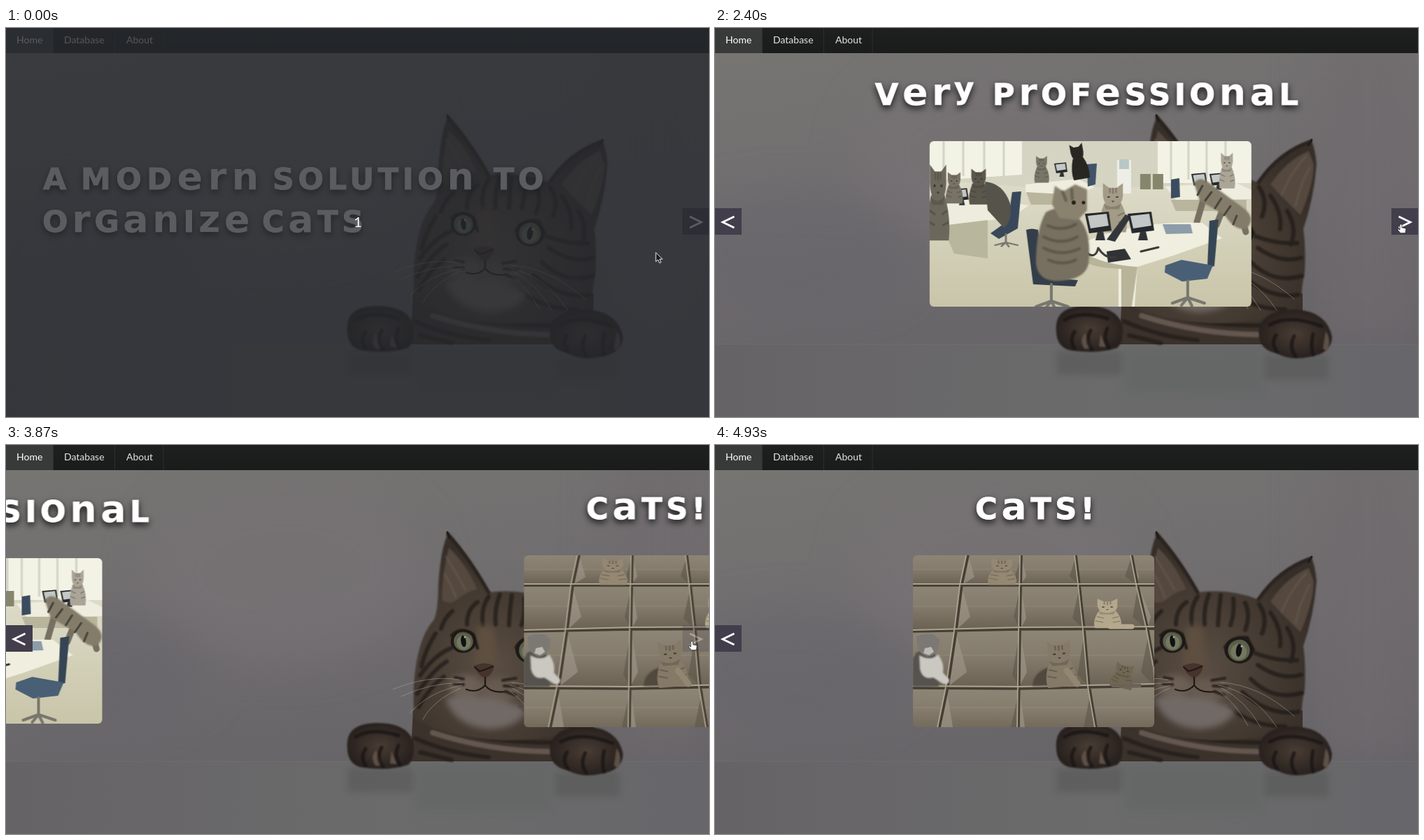
These frames come from a looping animation (1005x557 px, 5860 ms). An HTML page without scripts:

```html
<!DOCTYPE html>
<html lang="en">
<head>
<meta charset="utf-8">
<title>Organize cats</title>
<style>
html, body { margin: 0; width: 100%; height: 100%; overflow: hidden; background: #6f6c6e; }
svg { display: block; width: 100%; height: 100%; }

.nav { font: 14px Lato, sans-serif; fill: #e4e4e4; }
.title { font: bold 43px "DejaVu Sans", sans-serif; letter-spacing: 5.6px; fill: #fff; stroke: #fff; filter: drop-shadow(0 4px 5px rgba(0,0,0,.8)); }
.title .l { font-size: 54px; stroke: none; }
.line { fill: none; stroke-linecap: round; stroke-linejoin: round; }
.soft { filter: blur(5px); }
.fuzz { filter: blur(1.2px); }

.track, .prev, .next, .arrow, .hand, .veil { animation: 5860ms infinite; }
.track { animation-name: slide; animation-timing-function: ease; }
.prev { animation-name: show; animation-timing-function: linear; }
.next { animation-name: hide; animation-timing-function: linear; }
.arrow { animation-name: point; animation-timing-function: step-end; }
.hand { animation-name: press; animation-timing-function: step-end; }
.veil { animation-name: lift; animation-timing-function: step-end; }

@keyframes slide {
  0%, 35.273% { transform: translateX(0); }
  43.976%, 63.089% { transform: translateX(-1005px); }
  72.474%, 100% { transform: translateX(-2010px); }
}
@keyframes show { 0%, 35.2% { opacity: 0; } 35.32% { opacity: .1; } 39.2%, 100% { opacity: 1; } }
@keyframes hide { 0%, 63.09% { opacity: 1; } 67%, 100% { opacity: 0; } }
@keyframes point {
  0% { transform: translate(929px,321px); opacity: 1; }
  11.945% { transform: translate(938px,315px); }
  13.652% { transform: translate(947px,305px); }
  15.358% { transform: translate(954px,296px); }
  18.771% { transform: translate(960px,292px); }
  20.478% { transform: translate(966px,288px); opacity: 1; }
  22.184% { transform: translate(966px,288px); opacity: 0; }
  81.911% { transform: translate(962px,222px); opacity: 1; }
  82.935% { transform: translate(934px,146px); opacity: 1; }
  84.13%, 100% { transform: translate(934px,146px); opacity: 0; }
}
@keyframes press { 0% { opacity: 0; } 22.184% { opacity: 1; } 81.911%, 100% { opacity: 0; } }
@keyframes lift { 0% { opacity: 1; } .512%, 100% { opacity: 0; } }
</style>
</head>
<body>
<svg viewBox="0 0 1005 557" preserveAspectRatio="none">
<defs>
  <linearGradient id="wall" x2=".25" y2="1">
    <stop stop-color="#777672"/><stop offset=".45" stop-color="#716e70"/><stop offset="1" stop-color="#656267"/>
  </linearGradient>
  <linearGradient id="table">
    <stop stop-color="#666367"/><stop offset=".55" stop-color="#6b6b6b"/><stop offset="1" stop-color="#67666a"/>
  </linearGradient>
  <linearGradient id="bar" x2="0" y2="1"><stop stop-color="#1d201f"/><stop offset="1" stop-color="#191c1b"/></linearGradient>
  <radialGradient id="fur" cx=".4" cy=".65" r=".62">
    <stop stop-color="#5b4f44"/><stop offset=".5" stop-color="#473d34"/><stop offset="1" stop-color="#362e28"/>
  </radialGradient>
  <radialGradient id="paw"><stop stop-color="#493d34"/><stop offset="1" stop-color="#28211e"/></radialGradient>
  <linearGradient id="floor" x2="0" y2="1"><stop stop-color="#e4e3d3"/><stop offset="1" stop-color="#c9c5a9"/></linearGradient>
  <linearGradient id="card" x2="0" y2="1"><stop stop-color="#8d8575"/><stop offset=".45" stop-color="#857c6d"/><stop offset="1" stop-color="#6a6153"/></linearGradient>
  <clipPath id="wide"><rect width="460" height="237" rx="6"/></clipPath>
  <clipPath id="tall"><rect width="345" height="246" rx="6"/></clipPath>

  <g id="kit">
    <path d="M-11 8Q-20 30-16 46H17Q21 26 10 7z" fill="currentColor"/>
    <path d="M-13-3L-13-18-5-12H5L13-18 13-2Q12 12 0 13-12 12-13-3z" fill="currentColor"/>
    <path class="line" d="M-4-11v5M0-11v6M4-11v5M-13 21l8 3M-15 30l9 3M14 21l-7 3M16 31l-8 2" stroke="#2b261f" stroke-opacity=".3" stroke-width="2"/>
    <path d="M-7-1h3v2h-3zM4-1h3v2H4zM-2 5h4l-2 2z" fill="#2b261f" opacity=".8"/>
    <path d="M-12 9Q0 17 11 8L8 16H-9z" fill="#2b261f" opacity=".22"/>
  </g>
  <g id="eye">
    <ellipse rx="20" ry="18" fill="#1e1a17"/><circle r="15" fill="#5c604b"/><circle cy="2" r="11" fill="#737860"/>
    <ellipse rx="4" ry="9" fill="#111"/><circle cx="3" cy="-6" r="1.500" fill="#a9aba0"/>
  </g>
  <g id="screen">
    <path d="M0 0L34-3 38 24 6 28z" fill="#26282b"/><path d="M4 3L31 0 34 17 8 21z" fill="#c3c7c6"/>
    <path d="M18 26l8-1 3 13H15z" fill="#303236"/>
  </g>
  <g id="seat">
    <path class="line" d="M0 0v24M0 24l-22 8M0 24l24 8M0 24l6 12M0 24l-9 11" stroke="#77776d" stroke-width="4"/>
  </g>
  <g id="button">
    <path d="M0 0h38v38H0z" fill="#423e4c"/>
    <path d="M10.500 12L27 20 10.500 28" fill="none" stroke="#fff" stroke-width="2.800"/>
  </g>
</defs>

<rect width="1005" height="557" fill="url(#wall)"/>
<g style="filter:blur(30px)">
  <ellipse cx="110" cy="320" rx="180" ry="85" fill="#67656a" opacity=".5"/>
  <ellipse cx="400" cy="180" rx="200" ry="130" fill="#777375" opacity=".7"/>
  <path d="M860 0h145v453H860z" fill="#706c6e" opacity=".7"/>
</g>
<path d="M0 453H1005V557H0z" fill="url(#table)"/>
<path d="M0 453H1005" stroke="#777477" stroke-opacity=".6"/>
<g class="soft">
  <path d="M488 462h94v35h-94zM785 468h92v35h-92z" fill="#595a59" opacity=".7"/>
  <path d="M585 458h195v65H585z" fill="#656766" opacity=".8"/>
</g>

<g class="cat">
  <path d="M582 380H840V420L795 453H578z" fill="#3b322b"/>
  <path class="line fuzz" d="M610 412Q690 438 776 439" stroke="#645750" stroke-width="8"/>
  <path class="line fuzz" d="M585 420q50 22 105 27M592 440l45 11M660 414q50 12 120 12M740 404q40 10 75 3" stroke="#231d1a" stroke-width="6" opacity=".8"/>
  <path class="fuzz" fill="url(#fur)" d="M632 127Q622 145 618 200 618 235 612 250 594 270 587 310 580 350 584 392 630 420 710 423 800 422 839 400 837 375 843 350 845 315 841 288 856 245 860 195 858 172 852 160 805 178 776 221 735 205 690 211 668 165 632 127z"/>
  <g class="fuzz">
    <path d="M633 147Q624 180 623 222 637 232 652 216 665 208 674 207 658 170 633 147zM849 176Q817 189 794 224 812 244 837 268 856 225 856 195z" fill="#54483f"/>
    <path class="line" d="M629 160q16 25 28 47M627 185q10 15 16 33M845 184q-20 20-35 55M850 200q-14 25-20 55" stroke="#6d5f56" stroke-width="3" opacity=".5"/>
    <path class="line" d="M632 128Q661 161 690 211M851 163Q806 178 777 221" stroke="#2a231f" stroke-width="5"/>
  </g>
  <path class="line" d="M634 133l-3-8M848 168l5-8" stroke="#211c19" stroke-width="3"/>

  <g class="line fuzz" stroke="#1f1a17" stroke-width="6" opacity=".72">
    <path d="M690 217q-12 17-8 42M706 214q-8 20-6 43M723 215q-3 22-4 43M741 220q2 20-4 38M758 226q8 18 0 39M674 225q-15 10-15 32M778 228q13 20 4 42"/>
    <path d="M638 238q-12 10-16 25M614 270q-14 22-20 47M794 240q17 24 14 48M818 262q15 25 5 48"/>
    <path d="M636 291q-23 9-44 39M630 310q-21 13-42 46M626 332q-19 13-36 43M772 298q32 12 60 10M776 315q34 23 62 14M766 335q32 32 73 20M754 354q39 35 80 28M735 376q34 27 80 27"/>
  </g>
  <path class="soft" d="M674 262Q682 252 698 264L702 315H669z" fill="#5e4f40"/>
  <g class="soft">
    <ellipse cx="657" cy="345" rx="24" ry="16" fill="#6d6056"/>
    <ellipse cx="706" cy="350" rx="28" ry="17" fill="#675a50"/>
    <path d="M628 362Q680 350 745 378 735 405 690 407 640 402 628 362z" fill="#716965"/>
  </g>
  <use href="#eye" transform="translate(654 281) rotate(-8) scale(.92)"/>
  <use href="#eye" transform="translate(749 294) rotate(8) scale(1.04)"/>
  <path class="line fuzz" d="M637 273q12-14 31-2l6 20M729 290q10-17 32-14l9 18" stroke="#1d1815" stroke-width="4"/>
  <path d="M669 316q15-7 29 0-2 13-13 18-12-5-16-18z" fill="#46332c"/>
  <path class="line" d="M670 318l7 6 7-2 12-5M685 333v11M658 350q16 6 27-6 8 12 30 9" stroke="#201815" stroke-width="2.200"/>
  <path class="line fuzz" d="M642 333l12 2M640 342l14 1M710 337l19-3M712 345l20 1M714 353l14 5" stroke="#2b231f" stroke-width="4"/>
  <g class="line" stroke="#b1a79f" stroke-opacity=".5">
    <path d="M652 340q-48 1-87 20M652 344q-47 9-75 40M650 348q-40 18-54 45M648 336q-45-7-95 14"/>
    <path d="M720 344q50 10 83 60M724 348q35 18 56 56M723 340q54 3 105 48M720 352q25 18 42 50"/>
  </g>
  <g class="fuzz">
    <path d="M488 424Q491 399 528 398 571 397 582 423 585 450 575 458 547 467 511 462 485 459 488 424z" fill="url(#paw)"/>
    <path d="M778 429Q786 403 830 403 875 406 882 442 882 466 850 471 824 477 803 466 774 460 778 429z" fill="url(#paw)"/>
    <path d="M529 437q-9 10-1 22 9 2 9-5zM551 438l-2 18 10 1zM873 434q9 13 2 29l-6-4z" fill="#5f5046"/>
    <path class="line" d="M500 418q22-14 61-2M514 435q-8 12 0 24M537 433q-8 15 2 27M561 430q-7 15 2 28M793 425q28-16 74 2M802 440q-8 12 2 24M828 441q-8 16 2 29M855 438q-4 17 0 30" stroke="#191514" stroke-width="5" opacity=".8"/>
  </g>
</g>

<g class="track">
  <g class="title">
    <text y="231"><tspan x="53">A</tspan> <tspan x="107" letter-spacing="7.5">MOD</tspan><tspan class="l" letter-spacing="7.5">ern</tspan> <tspan x="381">SOLUTIO</tspan><tspan class="l">n</tspan> <tspan x="697">TO</tspan></text>
    <text y="292"><tspan x="52">O</tspan><tspan class="l">r</tspan>G<tspan class="l">an</tspan>I<tspan class="l">ze</tspan> <tspan x="366">C</tspan><tspan class="l">a</tspan>TS</text>
  </g>

  <g transform="translate(1005)">
    <text class="title" y="110"><tspan x="147">V</tspan><tspan class="l">er</tspan><tspan dy="-9">y</tspan> <tspan x="315" dy="9">P</tspan><tspan class="l">r</tspan>OF<tspan class="l">e</tspan>SSIO<tspan class="l">na</tspan>L</text>
    <g transform="translate(225 162)" clip-path="url(#wide)">
      <path d="M0 0h460v237H0z" fill="url(#floor)"/>
      <path d="M0 0h460v48L325 66H140L0 55z" fill="#d5d4c3"/>
      <path d="M0 0h132v48L0 57zM326 0h134v60H326z" fill="#f2f2e5"/>
      <path d="M20 0v50M48 0v50M78 0v50M106 0v50M345 0v55M370 0v55M396 0v55M423 0v55" stroke="#d4d4c4" stroke-width="3"/>
      <path d="M268 27h20v48h-20z" fill="#eeeee7"/><path d="M271 26h14v14h-14z" fill="#b9c7c5"/>
      <path d="M301 47h15v22h-15zM319 47h15v22h-15z" fill="#85866b"/>
      <path d="M137 62l75-8 24 12-28 12-71-4zM337 65l100-6 23 11v13l-108 1z" fill="#eeedde"/>
      <path d="M138 73l70 4v14h-63zM345 84h108v16H352z" fill="#b9b59d"/>
      <use href="#screen" transform="translate(178 32) scale(.5)"/>
      <use href="#screen" transform="translate(374 47) scale(.6)"/>
      <use href="#screen" transform="translate(400 47) scale(.6)"/>
      <use href="#kit" transform="translate(160 32) scale(.6)" color="#777567"/>
      <path d="M225 33l14-1-2 30-11 3z" fill="#405369"/>
      <use href="#kit" transform="translate(211 18) rotate(-10) scale(.7 .8)" color="#292722"/>
      <use href="#kit" transform="translate(425 31) scale(.65 .8)" color="#aaa596"/>
      <path d="M345 55l12-2 1 27-13 2z" fill="#3c4c60"/>

      <path d="M0 93L70 80 142 92 116 110 18 121z" fill="#edecdd"/>
      <path d="M18 121l65-8v55l-48-7z" fill="#b9b69e"/>
      <use href="#screen" transform="translate(33 69) scale(.6)"/>
      <use href="#kit" transform="translate(12 64) scale(.9 1.700)" color="#6c675b"/>
      <use href="#kit" transform="translate(35 57) scale(.7)" color="#787365"/>
      <path d="M118 73l13-1-5 53-27 15-12-8 25-18z" fill="#39475a"/>
      <use href="#seat" transform="translate(109 133) scale(.7 .5)"/>
      <use href="#kit" transform="translate(70 54) scale(.8)" color="#5c574d"/>
      <path d="M79 58q26 2 36 31 4 26-9 35L83 99z" fill="#55534a"/>

      <path class="line" d="M388 65q20 27 57 47M393 78l-11 38M420 95l-10 25M445 105l7 25" stroke="#777061" stroke-width="9"/>
      <path class="fuzz" d="M378 60q8-11 22 0l49 36q18 14 5 28-16 7-32-18l-36-21z" fill="#837c6a"/>
      <path class="line" d="M390 64l-7 13M403 73l-9 12M417 82l-9 14M430 93l-9 13M439 107l-5 12" stroke="#49443a" stroke-width="3"/>

      <path d="M216 147Q290 113 390 117L418 139 348 164 297 180 293 237H270V181Q240 179 216 166z" fill="#efeedf"/>
      <path d="M216 157q30 20 81 23l-8 57h-15v-54q-48-2-58-15z" fill="#b7b499"/>
      <path d="M333 119h40l3 13-38 1z" fill="#8d9ca9"/>
      <use href="#kit" transform="translate(262 80) scale(1.100)" color="#a39b86"/>
      <use href="#screen" transform="translate(222 104)"/>
      <path d="M280 105l8 3-23 36-12-3z" fill="#33363a"/>
      <use href="#screen" transform="translate(283 104)"/>
      <path d="M253 158l26-4 9 15-33 5z" fill="#303235"/>
      <path class="line" d="M222 158q15 13 19-5 10 16 25 13M302 158l25-6" stroke="#3a3b37" stroke-width="3"/>

      <path d="M138 127q8-3 17 0l11 68 46 4-4 9-60-3z" fill="#343e4a"/>
      <use href="#seat" transform="translate(174 205)"/>
      <g class="fuzz">
        <path d="M166 102q20-12 43 4 24 21 18 70-5 22-41 24-31 2-34-25 0-48 14-73z" fill="#777060"/>
        <path d="M179 64l12 8 17-10 17 7 0 30-13 14-27-3-10-20z" fill="#8a826f"/>
        <path class="line" d="M169 121q20 9 40-2M163 137q25 13 48 0M163 153q25 13 51 1M170 170q20 9 39 0M190 72l5 13M203 69l1 14" stroke="#4b463b" stroke-width="4" opacity=".6"/>
      </g>
      <circle cx="206" cy="88" r="3" fill="#28251f"/><circle cx="220" cy="88" r="2.500" fill="#28251f"/>
      <path d="M400 114l13-2-6 67-10 2z" fill="#354554"/>
      <path d="M337 178l23-8 45 8-8 19-36 4-25-13z" fill="#495f75"/>
      <use href="#seat" transform="translate(369 200)"/>
    </g>
  </g>

  <g transform="translate(2010)">
    <text class="title" y="106" letter-spacing="5"><tspan x="372">C</tspan><tspan class="l">a</tspan>TS!</text>
    <g transform="translate(283 158)" clip-path="url(#tall)">
      <g fill="url(#card)">
        <path d="M0 0h345v42H0z"/><path d="M0 42h345v65H0z"/><path d="M0 107h345v82H0z"/><path d="M0 189h345v70H0z"/>
      </g>
      <path d="M0 20h345M0 73h345M0 143h345M0 218h345" stroke="#9a9181" stroke-opacity=".6"/>
      <g fill="#a0978a" opacity=".65">
        <path d="M79 0l9 31-18 11zM155 0l7 30-8 12zM313 0l10 30-3 12z"/>
        <path d="M69 42l13 46-20 19zM154 42l8 48-9 17zM322 42l18 46-5 19z"/>
        <path d="M61 107l16 60-27 21zM153 107l10 60-11 21zM338 107l12 60-5 21z"/>
        <path d="M48 191l9 55H38zM152 191l8 55h-9z"/>
      </g>
      <g fill="#5d564a" opacity=".6">
        <path d="M155 0l-9 30 8 12zM233 0l-9 30 13 12zM313 0l-10 30 17 12z"/>
        <path d="M154 42l-10 46 9 19zM239 42l-11 48 17 17zM322 42l-8 46 21 19z"/>
        <path d="M153 107l-11 64 10 17zM246 107l-11 64 17 17zM338 107l-12 60 19 21z"/>
        <path d="M152 191l-12 55h11zM255 191l-11 55h18z"/>
      </g>
      <g class="line">
        <path d="M0 43h345M0 109l153-3 192-1M0 190l152 1 193-4M79 0l-9 42-8 65-12 81-12 58M155 0l-2 107-2 139M233 0l5 42 7 65 7 81 10 58M313 0l8 42 15 65 9 50" stroke="#453e34" stroke-width="3.500"/>
        <path d="M0 41h345M0 107l153-4 192-1M0 187l152 1 193-4M76 0l-9 42-8 65-12 81-12 58M153 0l-2 107-2 139M231 0l5 42 7 65 7 81 10 58M311 0l8 42 15 65 9 50" stroke="#aca28f" stroke-width="1.800"/>
      </g>
      <use href="#kit" transform="translate(127 15) scale(1.150 .6)" color="#958873"/>
      <use href="#kit" transform="translate(278 74) scale(1.100 .66)" color="#b3a88c"/>
      <path class="line" d="M282 102h31" stroke="#b5aa8e" stroke-width="7"/>
      <g class="fuzz">
        <path d="M4 140q15-9 28 2l5 46H0v-40z" fill="#56524e"/>
        <path d="M9 143q16 9 27-1 9 12 7 26l9 10q0 8-9 6l-14-9q-15 4-19-12z" fill="#cbc8c2"/>
      </g>
      <path d="M6 128l-1-12 10-3h14l9 7-2 15q-6 10-16 10-12-4-14-17z" fill="#7c7974"/>
      <path d="M17 133l9-2 4 7-7 5-8-3z" fill="#bdbab4"/>
      <path class="fuzz" d="M171 187q1-20 24-27l12 26z" fill="#51493d"/>
      <use href="#kit" transform="translate(209 141) rotate(-5) scale(1.250 1.030)" color="#857a68"/>
      <path class="line" d="M220 165l15 19" stroke="#91866f" stroke-width="9"/>
      <use href="#kit" transform="translate(302 165) rotate(14) scale(.95 .55)" color="#716654"/>
      <path d="M284 184h42v5h-42z" fill="#6b6356"/>
    </g>
  </g>
</g>

<g class="nav">
  <path d="M0 0h1005v36H0z" fill="url(#bar)"/>
  <path d="M0 0h67v36H0z" fill="#383a3a"/>
  <path d="M67.500 0v36M155.500 0v36M225 0v36" stroke="#2c2f2e"/>
  <text x="15" y="22" fill="#fff">Home</text>
  <text x="83" y="22">Database</text>
  <text x="172" y="22">About</text>
</g>

<g class="prev"><use href="#button" transform="translate(38 258) scale(-1 1)"/></g>
<g class="next"><use href="#button" transform="translate(967 258)"/></g>

<g class="veil">
  <path d="M0 0h1005v557H0z" fill="#272a2e" fill-opacity=".76"/>
  <text x="503" y="285" text-anchor="middle" fill="#fff" style="font:20px Lato,sans-serif">1</text>
</g>

<path class="arrow" d="M0 .5V13.500L3 10.800 5.200 15.500 7.500 14.500 5.400 10H9.500z" fill="#1b1b1b" stroke="#f0f0f0"/>
<g class="hand">
  <path transform="translate(975.500 280.500)" d="M5 .5c1 0 1.500.5 1.500 1.500v3.200l4.500 1c1 .3 1.500 1 1.300 2l-1 5H4.500L.6 8.800C0 7.800 1.300 6.800 2.200 7.500L3.500 8.700V2C3.500 1 4 .5 5 .5z" fill="#fff" stroke="#222" stroke-width=".8"/>
</g>
</svg>
</body>
</html>
```
